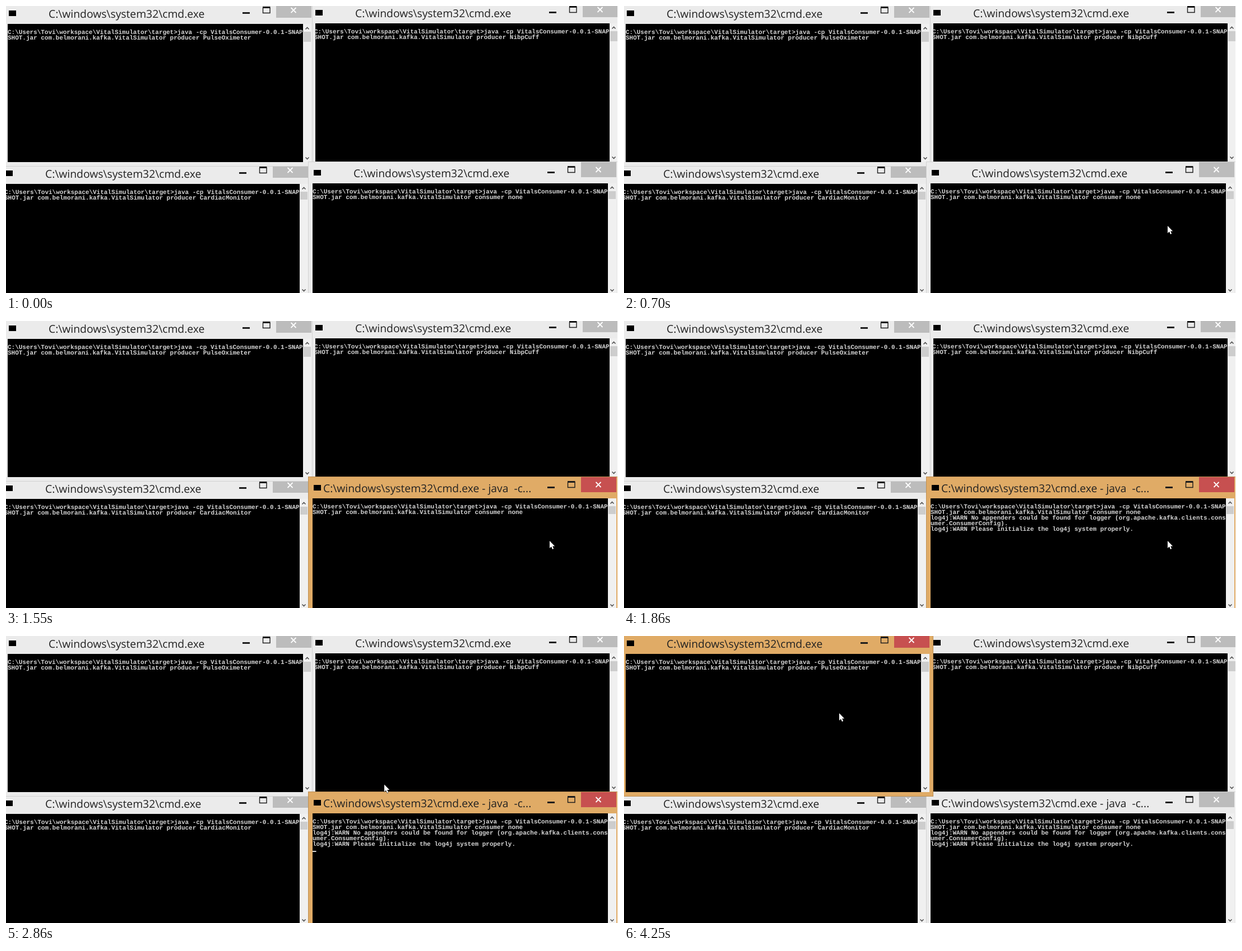
An HTML page that plays this animation: 1092x513 px, repeating every 7990 ms.

```html
<!DOCTYPE html>
<html lang="en">
<head>
<meta charset="utf-8">
<title>Four consoles</title>
<style>
  html, body { margin: 0; width: 100%; height: 100%; overflow: hidden; background: #ebebeb; }
  svg { display: block; width: 1092px; height: 513px; }
  text { white-space: pre; text-rendering: geometricPrecision; }
  .title { font: 19.3px "Open Sans", "Noto Sans", sans-serif; fill: #222; }
  .console { font: bold 10.98px "Liberation Mono", "DejaVu Sans Mono", monospace; fill: #d6d6d6; }
</style>
</head>
<body>
<svg id="stage" viewBox="0 0 1092 513"></svg>
<script>
const LOOP = 7990;
const LINE = 9.88;
const CONSUMER_TITLE_AT = 1550, WARNINGS_AT = 1860, CARET_AT = 2860;
const CONSUMER_FOCUS_AT = 770, PULSE_FOCUS_AT = 4250;

const stage = document.getElementById('stage');
const TITLE = 'C:\\windows\\system32\\cmd.exe';
const command = args => [
  'C:\\Users\\Tovi\\workspace\\VitalSimulator\\target>java -cp VitalsConsumer-0.0.1-SNAP',
  'SHOT.jar com.belmorani.kafka.VitalSimulator ' + args
];
const WARNINGS = [
  'log4j:WARN No appenders could be found for logger (org.apache.kafka.clients.cons',
  'umer.ConsumerConfig).',
  'log4j:WARN Please initialize the log4j system properly.'
];

// x, y, h: the console area; edge: frame width on the left; inset: part of the console hidden by it
const pulse = { x: 3, y: 32, h: 247, edge: 8, inset: 0, thumb: 18, lines: command('producer PulseOximeter') };
const cuff = { x: 550, y: 31, h: 247, edge: 4, inset: 2, thumb: 18, lines: command('producer NibpCuff') };
const cardiac = { x: -3, y: 318, h: 197, edge: 8, inset: 0, thumb: 14, lines: command('producer CardiacMonitor') };
const consumer = { x: 547, y: 317, h: 198, edge: 8, inset: 0, thumb: 14, lines: command('consumer none') };

// Pointer places: time, x, y; each is held until the next
const pointerSteps = [[380, 977, 408], [620, 974, 401], [700, 970, 393], [2550, 966, 393]];
for (let i = 1; i <= 8; i++) {
  const p = i / 8, k = p * p * (3 - 2 * p);
  pointerSteps.push([2550 + Math.round(7.75 * i) * 10, 966 - 582 * k, 393 - 255 * k]);
}

const rect = (x, y, w, h, fill) => `<rect x="${x}" y="${y}" width="${w}" height="${h}" fill="${fill}"/>`;
const path = (d, color, width) => `<path d="${d}" fill="none" stroke="${color}" stroke-width="${width}"/>`;
const label = (kind, x, y, s) =>
  `<text class="${kind}" x="${x}" y="${y}">${s.replace(/>/g, '&gt;')}</text>`;

function consoleWindow(win, { active, title = TITLE, titleX = 73, extra = [], caret }) {
  const { x, y, h, edge, inset, thumb } = win;
  const lines = [...win.lines, ...extra];
  const frame = active ? '#e0ab66' : '#ebebeb';
  const border = active ? '#bd8f54' : '#d2d2d2';
  const glyph = '#1c1c1c';
  const parts = [
    rect(x - edge, y - 39, 549 + edge, h + 47, frame),
    `<rect x="${x - edge + .5}" y="${y - 38.5}" width="${548 + edge}" height="${h + 46}" fill="none" stroke="${border}"/>`,
    rect(x + 2, y - 24, 13, 10, '#000'),
    label('title', x + titleX, y - 11.5, title),
    rect(x + 419, y - 21, 13, 3, glyph),
    path(`M${x + 455.5} ${y - 29}v9.5h12.5v-9.5`, glyph, 1.4),
    rect(x + 455, y - 31, 13.5, 3, glyph),
    rect(x + 479, y - 38, 63, 27, active ? '#c75050' : '#bcbcbc'),
    path(`M${x + 505.5} ${y - 29}l9 9m0-9l-9 9`, '#fff', 1.8),
    rect(x + inset, y, 527 - inset, h, '#000'),
    rect(x + 527, y, 15, h, '#f0f0f0'),
    rect(x + 528, y + 14, 13, thumb, '#cdcdcd'),
    path(`M${x + 531.5} ${y + 9.5}l3-3l3 3`, '#505050', 1.6),
    path(`M${x + 531.5} ${y + h - 8.5}l3 3l3-3`, '#505050', 1.6),
    ...lines.map((s, i) => label('console', x, y + LINE * (i + 1) + 8.1, s))
  ];
  if (caret) parts.push(rect(x, y + 67, 6.5, 2, '#d6d6d6'));
  return parts.join('');
}

function pointer(t) {
  const step = pointerSteps.filter(s => s[0] <= t).pop();
  if (!step) return '';
  return `<path transform="translate(${step[1]} ${step[2]})" fill="#fff" stroke="#000" stroke-width="1"
    paint-order="stroke" d="M0 0V13L3 10.2L5 15L7.2 14L5.2 9.5H9.2Z"/>`;
}

function scene(t) {
  const pulseActive = t >= PULSE_FOCUS_AT;
  const running = t >= CONSUMER_TITLE_AT;
  const pulseView = consoleWindow(pulse, { active: pulseActive });
  const consumerView = consoleWindow(consumer, {
    active: t >= CONSUMER_FOCUS_AT && !pulseActive,
    title: running ? TITLE + ' - java  -c...' : TITLE,
    titleX: running ? 19 : 73,
    extra: t >= WARNINGS_AT ? WARNINGS : [],
    caret: t >= CARET_AT && !pulseActive
  });
  const others = consoleWindow(cuff, {}) + consumerView;
  const screenEdge = rect(1091, 0, 1, 513, '#fff');
  return consoleWindow(cardiac, {}) +
    (pulseActive ? others + pulseView : pulseView + others) + screenEdge + pointer(t);
}

const cues = [0, CONSUMER_FOCUS_AT, CONSUMER_TITLE_AT, WARNINGS_AT, CARET_AT, PULSE_FOCUS_AT,
  ...pointerSteps.map(s => s[0])];
const start = performance.now();
let shown = -1;

function tick() {
  const t = (performance.now() - start) % LOOP;
  const cue = Math.max(...cues.filter(c => c <= t));
  if (cue !== shown) {
    shown = cue;
    stage.innerHTML = scene(cue);
  }
  requestAnimationFrame(tick);
}
tick();
</script>
</body>
</html>
```
